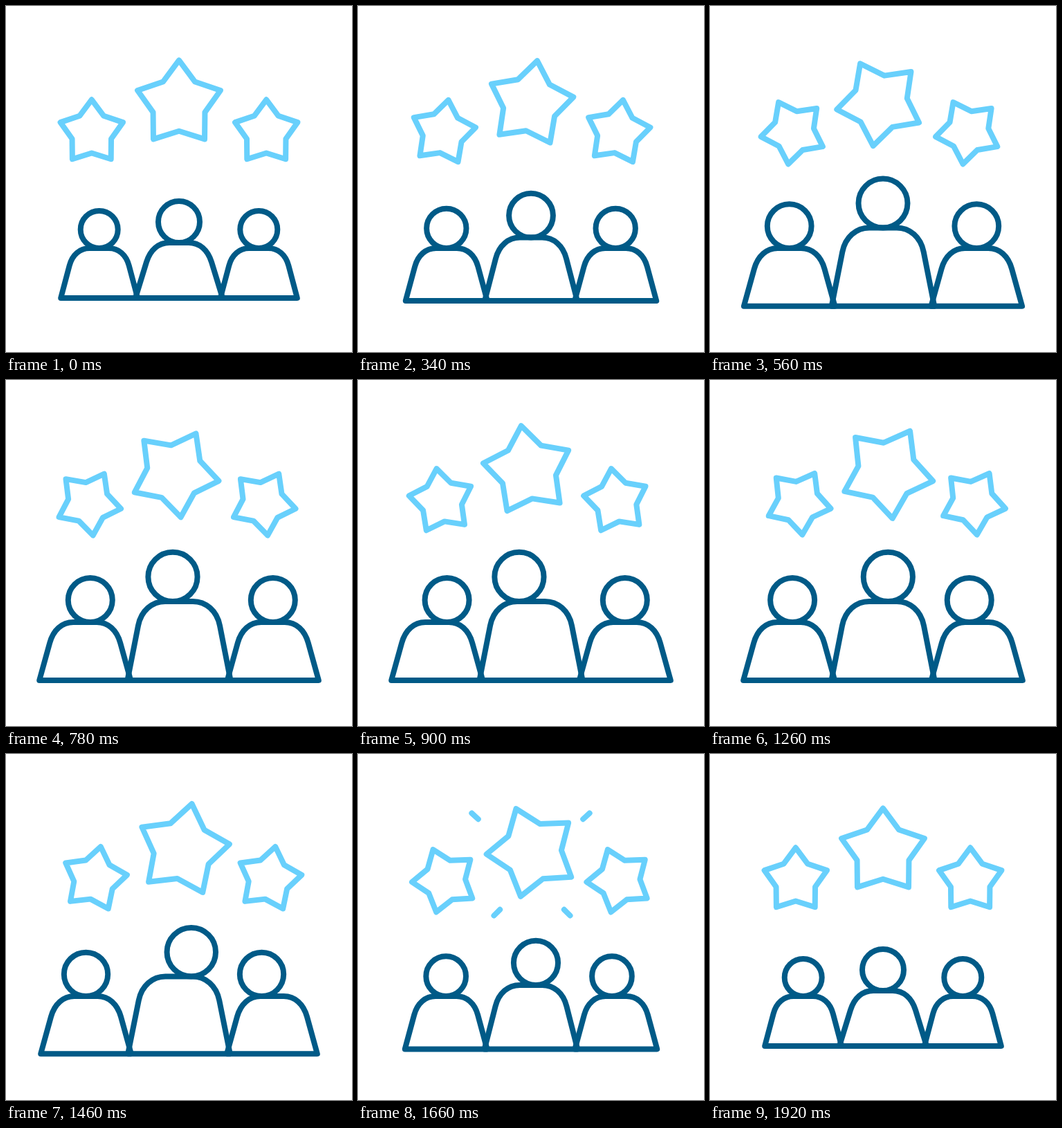
Write an HTML page that moves like this. It is 500 by 500 pixels and loops after 2 s.

```html
<!DOCTYPE html>
<html lang="en">
<head>
<meta charset="utf-8">
<title>Team with stars</title>
<style>
  html, body { margin: 0; width: 100%; height: 100%; overflow: hidden; background: #fff; }
  svg { display: block; width: 100%; height: 100%; fill: none; stroke-width: 8; stroke-linecap: round; stroke-linejoin: round; }
  #stars, #ticks { stroke: #68d0fc; }
  #people { stroke: #005a87; }
</style>
</head>
<body>
<svg viewBox="0 0 500 500">
  <g id="stars"></g>
  <g id="ticks"></g>
  <g id="people"></g>
</svg>
<script>
const LOOP = 2000;
const START = 176, END = 1916;          // star spin
const GROWN = 600, SHRINK = 1390, REST = 1850;

const lerp = (a, b, k) => a + (b - a) * k;

// Eased 0..1 progress between two times
function ease(t, from, to) {
  const p = Math.min(1, Math.max(0, (t - from) / (to - from)));
  return p * p * (3 - 2 * p);
}

// Eased value through [time, value] steps
function track(t, steps) {
  let value = steps[0][1];
  for (let i = 1; i < steps.length; i++) {
    value = lerp(value, steps[i][1], ease(t, steps[i - 1][0], steps[i][0]));
  }
  return value;
}

function add(parent, tag, attrs = {}) {
  const el = document.createElementNS('http://www.w3.org/2000/svg', tag);
  set(el, attrs);
  document.getElementById(parent).append(el);
  return el;
}

function set(el, attrs) {
  for (const name in attrs) el.setAttribute(name, attrs[name]);
}

// Five-pointed star turning about the middle of its bounding box
function starPath(x, y, radius, turn) {
  const points = [];
  const drop = radius * (1 - Math.cos(Math.PI / 5)) / 2;
  const angle = turn * Math.PI / 180;
  const cx = x - drop * Math.sin(angle);
  const cy = y + drop * Math.cos(angle);
  for (let i = 0; i < 10; i++) {
    const a = angle + i * Math.PI / 5;
    const r = i % 2 ? radius * 0.625 : radius;
    points.push((cx + r * Math.sin(a)).toFixed(2) + ' ' + (cy - r * Math.cos(a)).toFixed(2));
  }
  return 'M' + points.join('L') + 'Z';
}

// Shoulders and torso, symmetric about x
function bodyPath(x, b) {
  const lean = (b.half - b.wide) / (b.base - b.top - b.drop);
  const rise = b.drop * 0.62;
  const inX = b.wide - lean * rise;
  const topX = lerp(b.flat, b.wide, 0.48);
  const shoulder = b.top + b.drop;
  const bend = shoulder - rise;
  return `M${x - b.half} ${b.base}L${x - b.wide} ${shoulder}` +
    `C${x - inX} ${bend} ${x - topX} ${b.top} ${x - b.flat} ${b.top}` +
    `L${x + b.flat} ${b.top}` +
    `C${x + topX} ${b.top} ${x + inX} ${bend} ${x + b.wide} ${shoulder}` +
    `L${x + b.half} ${b.base}Z`;
}

// Each pair is [small, grown]
const SIDE = { top: [350, 350], base: [422, 434], half: [55.5, 66], wide: [43, 51], drop: [25, 30], flat: [14, 17], head: [27, 32] };
const MIDDLE = { top: [342, 320], base: [422, 434], half: [63, 74.5], wide: [47, 59], drop: [28, 35], flat: [14, 20], head: [30, 35.6] };

const people = [
  { x: [134.7, 114.2], shape: SIDE, sway: [[600, 0], [975, 16], [1040, 16], [1390, 0]] },
  { x: [365.3, 385.8], shape: SIDE, sway: [[1040, 0], [1390, -16], [REST, 0]] },
  { x: [250, 250], shape: MIDDLE, sway: [[600, 0], [975, -19], [1040, -19], [1390, 19], [REST, 0]] }
].map(p => ({ ...p, body: add('people', 'path'), face: add('people', 'circle') }));

const stars = [
  { x: 123.8, y: 178.3, r: 47.5 },
  { x: 376.2, y: 178.3, r: 47.5 },
  { x: 250, y: 135.4, r: 63, size: [[440, 1], [1336, 1.075], [1550, 1.075], [END, 1]] }
].map(s => ({ ...s, el: add('stars', 'path') }));

// Inner end and outer end of each spark
const ticks = [
  [179, 99, 153, 75], [320, 99, 346, 75],
  [210, 220, 186, 244], [293, 220, 317, 244]
].map(line => ({ line, el: add('ticks', 'line') }));

function drawPerson(p, t, grow) {
  const b = {};
  for (const key in p.shape) b[key] = lerp(...p.shape[key], grow);
  const x = lerp(...p.x, grow);
  set(p.body, { d: bodyPath(x, b) });
  set(p.face, { cx: x + track(t, p.sway), cy: b.top - b.head, r: b.head });
}

function drawTick({ line: [x1, y1, x2, y2], el }, head, tail) {
  set(el, {
    x1: lerp(x1, x2, tail), y1: lerp(y1, y2, tail),
    x2: lerp(x1, x2, head), y2: lerp(y1, y2, head),
    visibility: head > 0 && tail < 1 ? 'visible' : 'hidden'
  });
}

function draw(t) {
  const turn = 360 * ease(t, START, END);
  for (const s of stars) {
    const size = s.size ? track(t, s.size) : 1;
    set(s.el, { d: starPath(s.x, s.y, s.r * size, turn) });
  }
  const grow = track(t, [[START, 0], [GROWN, 1], [SHRINK, 1], [REST, 0]]);
  for (const p of people) drawPerson(p, t, grow);
  const head = ease(t, 1471, 1821), tail = ease(t, 1560, 1910);
  for (const tick of ticks) drawTick(tick, head, tail);
}

const begin = performance.now();
function frame() {
  draw((performance.now() - begin) % LOOP);
  requestAnimationFrame(frame);
}
frame();
</script>
</body>
</html>
```
